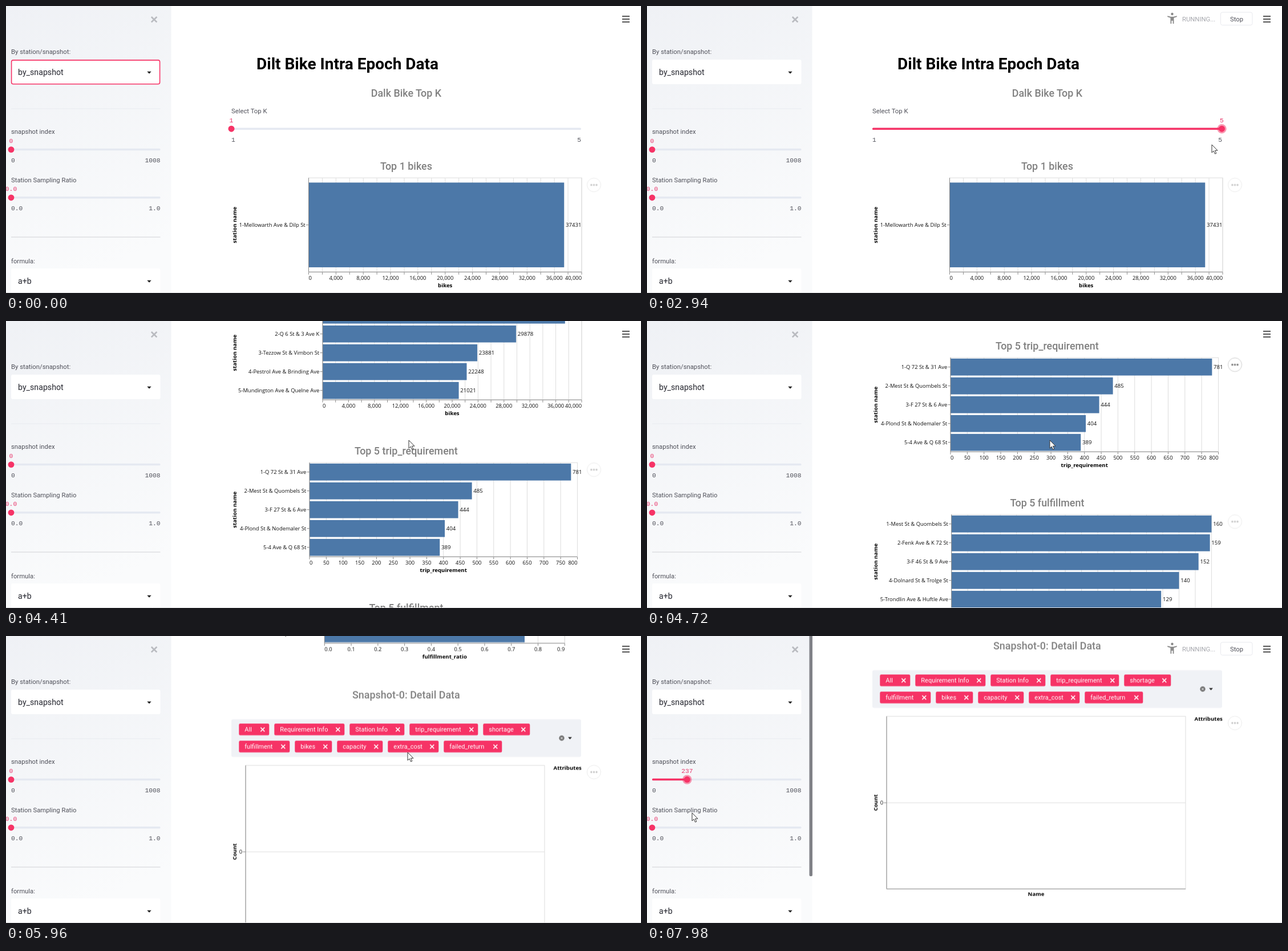
Write an HTML page that moves like this. It is 1113x503 px and loops after 8000 ms.

```html
<!DOCTYPE html>
<html lang="en">
<head>
<meta charset="utf-8">
<title>Bike data dashboard</title>
<style>
html, body { margin: 0; width: 100%; height: 100%; overflow: hidden; background: #fff; }
svg { display: block; width: 100%; height: 100%; }
text { font: 11.3px Roboto, sans-serif; fill: #50515a; }
.h1 { font-size: 28px; font-weight: 700; fill: #000; }
.h3 { font-size: 17.9px; font-weight: 500; fill: #808080; text-anchor: middle; }
.pick { font-size: 14.2px; fill: #262730; }
.mono { font: 11.3px "Liberation Mono", monospace; }
.val { fill: #e8386c; text-anchor: middle; }
.end { text-anchor: end; }
.mid { text-anchor: middle; }
.tag { font-size: 11px; fill: #fff; }
.ax { font: 9.4px "Open Sans", sans-serif; fill: #111; }
.num { font: 9.65px "Open Sans", sans-serif; fill: #111; }
.axt { font: 700 9.65px "Open Sans", sans-serif; fill: #000; }
.track { fill: #e5e9f1; }
.hot { fill: #f63366; }
.halo { fill: #f63366; opacity: .5; }
.bar { fill: #4c78a8; }
.grid { stroke: #ddd; fill: none; }
.dom { stroke: #888; fill: none; }

/* one loop is 8 s, so 1% is 80 ms */
.anim, .step, .dots { animation: 8s linear infinite; }
.step { animation-timing-function: step-end; }
.late { opacity: 0; }

#page { animation-name: scroll; }
@keyframes scroll {
  0%, 47% { transform: translateY(0); }
  48.625%, 49.4% { transform: translateY(-74.3px); }
  50.2% { transform: translateY(-92px); }
  53.375%, 54.25% { transform: translateY(-256px); }
  55.125%, 56% { transform: translateY(-328px); }
  59%, 62.25% { transform: translateY(-512px); }
  65.75%, 66.7% { transform: translateY(-785.6px); }
  72.5%, 73.2% { transform: translateY(-1194px); }
  74.5%, 80.75% { transform: translateY(-1278.5px); }
  83.1%, 100% { transform: translateY(-1364.5px); }
}
#cursor { animation-name: point; }
@keyframes point {
  0%, .86% { transform: translate(640px, 440px); opacity: 0; }
  .87% { transform: translate(640px, 440px); opacity: 1; }
  6% { transform: translate(190px, 140px); }
  8.6%, 10% { transform: translate(112px, 112px); }
  20.2%, 21% { transform: translate(908px, 192px); }
  22.25%, 23.2% { transform: translate(954px, 197px); }
  27%, 33.4% { transform: translate(1004px, 212px); }
  36.75%, 38.2% { transform: translate(990px, 243px); }
  48.625%, 49.4% { transform: translate(869px, 223px); }
  54.5%, 73% { transform: translate(706px, 209px); }
  74.5%, 84.4% { transform: translate(704px, 204px); }
  90.6% { transform: translate(42px, 258px); }
  91.9%, 93% { transform: translate(58px, 250px); }
  94%, 95.5% { transform: translate(70px, 249px); }
  99.5%, 100% { transform: translate(79px, 310px); opacity: 1; }
}
#focus { animation-name: blur; }
@keyframes blur { 0%, 27.5% { opacity: 1; } 32%, 100% { opacity: 0; } }

#k-before { animation-name: k-off; }
#k-after { animation-name: k-on; }
@keyframes k-off { 27.5%, 100% { opacity: 0; } }
@keyframes k-on { 27.5%, 100% { opacity: 1; } }
#top1 { animation-name: top-off; }
#top5 { animation-name: top-on; }
@keyframes top-off { 40%, 100% { opacity: 0; } }
@keyframes top-on { 40%, 100% { opacity: 1; } }
#i-before { animation-name: i-off; }
#i-after { animation-name: i-on; }
@keyframes i-off { 94%, 100% { opacity: 0; } }
@keyframes i-on { 94%, 100% { opacity: 1; } }
#run { animation-name: run; }
@keyframes run { 34%, 97%, 100% { opacity: 1; } 40% { opacity: 0; } }
#thumb { animation-name: thumb; }
@keyframes thumb { 5%, 88.4%, 100% { opacity: 1; } 12.7% { opacity: 0; } }

/* chart menus darken while the pointer is over their chart */
.dots { opacity: .4; animation-timing-function: step-end; }
#menu0 { animation-name: over0; }
#menu1 { animation-name: over1; }
#menu2 { animation-name: over2; }
#menu3 { animation-name: over3; }
@keyframes over0 { .9%, 50.2% { opacity: 1; } 4.6%, 54.3% { opacity: .4; } }
@keyframes over1 { 56.8% { opacity: 1; } 63.2% { opacity: .4; } }
@keyframes over2 { 64% { opacity: 1; } 67.6% { opacity: .4; } }
@keyframes over3 { 68.6% { opacity: 1; } 71.3% { opacity: .4; } }
</style>
</head>
<body>
<svg id="stage" viewBox="0 0 1113 503">
  <defs>
    <linearGradient id="side" x2=".25" y2="1">
      <stop stop-color="#eff1f5"/><stop offset="1" stop-color="#fafbfc"/>
    </linearGradient>
  </defs>

  <g id="page" class="anim">
    <text class="h1" x="439" y="111">Dilt Bike Intra Epoch Data</text>
    <text class="h3" x="701.4" y="158.8">Dalk Bike Top K</text>
    <text x="395" y="188.3">Select Top K</text>
    <rect class="track" x="395" y="213.4" width="613" height="3.6" rx="1.5"/>
    <g id="k-before" class="step">
      <circle class="hot" cx="395" cy="215.2" r="5.5"/>
      <text class="mono val" x="395" y="204">1</text>
    </g>
    <g id="k-after" class="step late">
      <rect class="hot" x="395" y="213.4" width="613" height="3.6" rx="1.5"/>
      <circle class="halo" cx="1007.5" cy="215.2" r="8.2"/>
      <circle class="hot" cx="1007.5" cy="215.2" r="5.5"/>
      <text class="mono val" x="1007.5" y="204">5</text>
    </g>
    <text class="mono" x="395" y="237.5">1</text>
    <text class="mono end" x="1008" y="237.5">5</text>
    <g id="top1" class="step"></g>
    <g id="top5" class="step late"></g>
    <g id="more"></g>

    <g id="detail" transform="translate(0 1278.5)">
      <text class="h3" x="701.4" y="109.3">Snapshot-0: Detail Data</text>
      <rect x="395" y="146" width="613" height="66" rx="3" fill="#f0f2f6"/>
      <circle cx="974" cy="179" r="4.7" fill="#777"/>
      <path d="M972.3 177.3l3.4 3.4m0-3.4l-3.4 3.4" stroke="#fff"/>
      <path d="M985 177.3h7l-3.5 3.8z" fill="#222"/>
      <rect class="grid" x="420" y="226.8" width="524" height="302.5"/>
      <path class="grid" d="M420 378.3h524"/>
      <path class="dom" d="M420 226.8v302.5h524M415 378.3h5"/>
      <text class="ax end" x="414" y="381.4">0</text>
      <text class="axt mid" transform="translate(403.5 378)rotate(-90)">Count</text>
      <text class="axt mid" x="682" y="541">Name</text>
      <text class="axt" x="959.5" y="234.5">Attributes</text>
    </g>
  </g>

  <g stroke="#222" stroke-width="1.7">
    <path d="M1080 18h13M1080 23h13M1080 28h13"/>
  </g>
  <g id="run" class="step late">
    <circle cx="920.5" cy="14" r="2.2" fill="#8a8a8a"/>
    <path d="M912.5 17.2l5.5 1.6h5l5.5-1.6.4 1.7-5.4 1.8V31h-1.8v-5.2h-2.4V31h-1.8V20.7l-5.4-1.8z" fill="#8a8a8a"/>
    <text x="938" y="27.3" style="fill:#a6a7ad">RUNNING...</text>
    <rect x="1005.5" y="11" width="55.5" height="22.5" rx="3" fill="#fff" stroke="#e8e9ee"/>
    <text x="1022" y="26.5">Stop</text>
  </g>

  <rect width="289.5" height="503" fill="url(#side)"/>
  <path d="M254.8 19l9.6 9.4m0-9.4l-9.6 9.4" stroke="#b9bbc0" stroke-width="2.7"/>
  <text x="9" y="83.6">By station/snapshot:</text>
  <rect x="9" y="94" width="261.5" height="43" rx="3" fill="#fff"/>
  <rect id="focus" class="anim" x="9.6" y="94.9" width="260" height="41.8" rx="3" fill="none" stroke="#f63366" stroke-width="1.6"/>
  <text class="pick" x="21" y="121.2">by_snapshot</text>
  <path d="M247.3 114.8h7.4l-3.7 3.9z" fill="#222"/>
  <path d="M9 180h261.5" stroke="#e8ebf0"/>

  <text x="9" y="224.4">snapshot index</text>
  <rect class="track" x="9" y="249.8" width="261.5" height="3.5" rx="1.5"/>
  <g id="i-before" class="step">
    <circle class="hot" cx="9" cy="251.6" r="5.4"/>
    <text class="mono val" x="9" y="240.2">0</text>
  </g>
  <g id="i-after" class="step late">
    <rect class="hot" x="9" y="249.8" width="61.4" height="3.5" rx="1.5"/>
    <circle class="halo" cx="70.3" cy="251.6" r="8.2"/>
    <circle class="hot" cx="70.3" cy="251.6" r="5.5"/>
    <text class="mono val" x="70.3" y="240.2">237</text>
  </g>
  <text class="mono" x="9" y="274">0</text>
  <text class="mono end" x="270.5" y="274">1008</text>

  <text x="9" y="308.8">Station Sampling Ratio</text>
  <rect class="track" x="9" y="334" width="261.5" height="3.5" rx="1.5"/>
  <circle class="hot" cx="9" cy="335.8" r="5.4"/>
  <text class="mono val" x="9" y="324.4">0.0</text>
  <text class="mono" x="9" y="358">0.0</text>
  <text class="mono end" x="270.5" y="358">1.0</text>

  <path d="M9 405h261.5" stroke="#d0d1d5"/>
  <text x="9" y="450.6">formula:</text>
  <rect x="9" y="460" width="261.5" height="43" rx="3" fill="#fff"/>
  <text class="pick" x="21" y="487.2">a+b</text>
  <path d="M247.3 480.8h7.4l-3.7 3.9z" fill="#222"/>
  <rect id="thumb" class="step late" x="284.5" y="-3" width="5.5" height="424" rx="2" fill="#808187"/>

  <path d="M0 502.5h1113" stroke="#dcdcde"/>
  <path id="cursor" class="anim" d="M0 0V14L3.2 11.1 5.5 16.2 7.8 15.2 5.5 10.2H10Z" fill="#fff" stroke="#333"/>
</svg>

<script>
const $ = id => document.getElementById(id);

function add(parent, tag, attrs, text) {
  const node = document.createElementNS("http://www.w3.org/2000/svg", tag);
  for (const key in attrs) node.setAttribute(key, attrs[key]);
  if (text !== undefined) node.textContent = text;
  parent.append(node);
  return node;
}

const PLOT_H = 165;
const comma = v => v.toLocaleString("en-US");

// rows: [label, value]; every: show each n-th tick label
function chart(parent, { top, left, right, max, step, every = 1, format = comma, name, rows }) {
  const g = add(parent, "g", { transform: `translate(0 ${top})` });
  const at = v => left + (right - left) * v / max;
  const ticks = Math.round(max / step);

  add(g, "text", { class: "h3", x: 701.4, y: -13.9 }, `Top ${rows.length} ${name}`);
  for (let i = 0; i <= ticks; i++) {
    const x = at(i * step);
    add(g, "path", { class: "grid", d: `M${x} 0v${PLOT_H}` });
    add(g, "path", { class: "dom", d: `M${x} ${PLOT_H}v4.5` });
    if (i % every) continue;
    const anchor = i === 0 ? "start" : i === ticks ? "end" : "middle";
    add(g, "text", { class: "ax", x, y: 178.4, "text-anchor": anchor }, format(i * step));
  }
  add(g, "rect", { class: "grid", x: left, y: 0, width: right - left, height: PLOT_H });

  const band = PLOT_H / rows.length;
  rows.forEach(([label, value], i) => {
    const mid = band * (i + .5);
    add(g, "rect", { class: "bar", x: left, y: mid - band * .45, width: at(value) - left, height: band * .9 });
    add(g, "path", { class: "dom", d: `M${left - 4.5} ${mid}h4.5` });
    add(g, "text", { class: "ax end", x: left - 5.8, y: mid + 3.1 }, `${i + 1}-${label}`);
    add(g, "text", { class: "num", x: at(value) + 2.7, y: mid + 3.3 }, value);
  });
  add(g, "path", { class: "dom", d: `M${left} 0v${PLOT_H}H${right}` });
  add(g, "text", { class: "axt mid", x: (left + right) / 2, y: 191.6 }, name);
  add(g, "text", { class: "axt mid", transform: "translate(404.3 82.5)rotate(-90)" }, "station name");
}

function menu(id, y) {
  const g = add($("page"), "g", { id, class: "dots", transform: `translate(1030.5 ${y})` });
  add(g, "circle", { r: 12, fill: "#fff", stroke: "#ccc" });
  for (const x of [-4.6, 0, 4.6]) add(g, "circle", { cx: x, r: 1.7, fill: "#777" });
}

const TOP = 301.2, GAP = 275;
const bikes = [
  ["Mellowarth Ave & Dilp St", 37431],
  ["Q 6 St & 3 Ave K", 29878],
  ["Tezzow St & Vimbon St", 23881],
  ["Pestrol Ave & Brinding Ave", 22248],
  ["Mundington Ave & Quelne Ave", 21021]
];
const bikeAxis = { top: TOP, right: 1009, max: 40000, step: 2000, every: 2, name: "bikes" };
chart($("top1"), { ...bikeAxis, left: 530.5, rows: bikes.slice(0, 1) });
chart($("top5"), { ...bikeAxis, left: 555, rows: bikes });
chart($("more"), {
  top: TOP + GAP, left: 532, right: 1001.5, max: 800, step: 50, name: "trip_requirement",
  rows: [
    ["Q 72 St & 31 Ave", 781],
    ["Mest St & Quombels St", 485],
    ["F 27 St & 6 Ave", 444],
    ["Plond St & Nodemaler St", 404],
    ["4 Ave & Q 68 St", 389]
  ]
});
chart($("more"), {
  top: TOP + 2 * GAP, left: 533.7, right: 989.5, max: 160, step: 10, name: "fulfillment",
  rows: [
    ["Mest St & Quombels St", 160],
    ["Fenk Ave & K 72 St", 159],
    ["F 46 St & 9 Ave", 152],
    ["Dolnard St & Trolge St", 140],
    ["Trondlin Ave & Huftle Ave", 129]
  ]
});
chart($("more"), {
  top: TOP + 3 * GAP, left: 558.3, right: 979.3, max: .9, step: .1, name: "fulfillment_ratio",
  format: v => v.toFixed(1),
  rows: [
    ["Mellowarth Ave & Dilp St", .8958],
    ["St Pomel Pl & Ulfrin St", .7931],
    ["Estrovic Ave & Pelt Quelne Pl", .7647],
    ["F 28 St & Tolvander Ave", .7499],
    ["Bolarone Ave & Quondalon Ave", .7498]
  ]
});
for (let i = 0; i < 4; i++) menu("menu" + i, TOP + GAP * i + 12.4);
menu("menu-detail", 1517);

// tag rows: [text, width]
const tags = [
  [["All", 53], ["Requirement Info", 123], ["Station Info", 96], ["trip_requirement", 120], ["shortage", 82]],
  [["fulfillment", 89], ["bikes", 65], ["capacity", 80], ["extra_cost", 89], ["failed_return", 102]]
];
tags.forEach((row, r) => {
  let x = 408.3;
  const y = 153.5 + 30 * r;
  for (const [text, width] of row) {
    add($("detail"), "rect", { class: "hot", x, y, width, height: 20.6, rx: 2.5 });
    add($("detail"), "text", { class: "tag", x: x + 10, y: y + 14.2 }, text);
    add($("detail"), "path", {
      d: `M${x + width - 15} ${y + 6.9}l7 7m0-7l-7 7`, stroke: "#fff", "stroke-width": 1.5
    });
    x += width + 9;
  }
});
</script>
</body>
</html>
```
